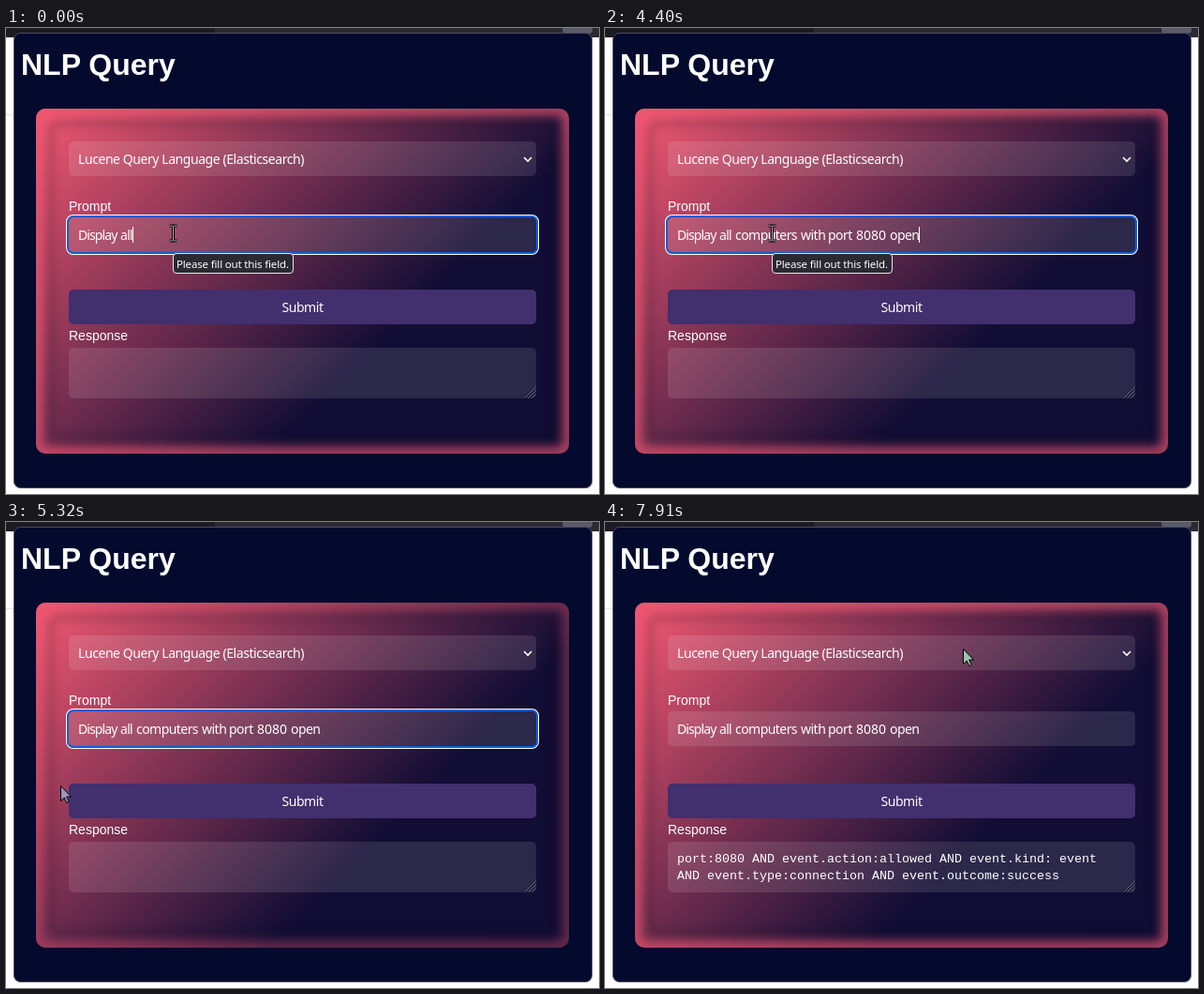
These frames come from a looping animation (633x497 px, 8 s). An HTML page:

```html
<!DOCTYPE html>
<html lang="en">
<head>
<meta charset="utf-8">
<title>NLP Query</title>
<style>
  html, body { margin: 0; width: 100%; height: 100%; overflow: hidden; background: #fff; }
  svg { display: block; width: 633px; height: 497px; }
  text { fill: #fff; white-space: pre; }
  .ui { font: 14px "Noto Sans", sans-serif; letter-spacing: -.43px; }
  .label { font: 14px "Liberation Sans", Arial, sans-serif; }
  .title { font: bold 32px "Liberation Sans", Arial, sans-serif; }
  .tip { font: 11.5px "Noto Sans", sans-serif; letter-spacing: -.16px; }
  .code { font: 13.333px "Liberation Mono", monospace; }
  .field { fill: #fff; fill-opacity: .11; }
</style>
</head>
<body>
<svg viewBox="0 0 633 497">
  <defs>
    <!-- 135deg across the 569 x 368 card -->
    <linearGradient id="fade" gradientUnits="userSpaceOnUse" x1="82.25" y1="35.75" x2="550.75" y2="504.25">
      <stop id="start" offset="0.02"/>
      <stop offset="0.66" stop-color="#110d34"/>
    </linearGradient>
    <clipPath id="cardClip"><rect x="32" y="86" width="569" height="368" rx="10"/></clipPath>
    <filter id="soft" x="-10%" y="-10%" width="120%" height="120%"><feGaussianBlur stdDeviation="6"/></filter>
    <filter id="softer" x="-10%" y="-10%" width="120%" height="120%"><feGaussianBlur stdDeviation="4"/></filter>
  </defs>

  <!-- browser window -->
  <rect width="633" height="10" fill="#2b2a33"/>
  <rect width="223" height="10" fill="#1c1b22"/>
  <rect x="594" y="-6" width="32" height="12" rx="4" fill="#5b5a68"/>
  <rect y="92" width="9" height="1" fill="#e4e4e8"/>
  <rect x="8.5" y="5.5" width="617" height="485" rx="7" fill="#030a2d" stroke="#4a4a63"/>
  <text class="title" x="16" y="50">NLP Query</text>

  <!-- card -->
  <g clip-path="url(#cardClip)">
    <rect x="32" y="86" width="569" height="368" fill="url(#fade)"/>
    <rect x="48" y="102" width="537" height="336" rx="8" fill="none" stroke="#060824" stroke-width="9" opacity=".14" filter="url(#softer)"/>
    <rect id="glow" x="32" y="86" width="569" height="368" rx="10" fill="none" stroke-width="13" filter="url(#soft)"/>
  </g>

  <rect class="field" x="67" y="121" width="499" height="37" rx="5"/>
  <text class="ui" x="77" y="145">Lucene Query Language (Elasticsearch)</text>
  <path d="M553 138l4 4 4-4" fill="none" stroke="#fff" stroke-width="1.6"/>

  <text class="label" x="67" y="195">Prompt</text>
  <rect class="field" x="67" y="202" width="499" height="37" rx="5"/>
  <g id="focus" fill="none">
    <rect x="64.7" y="199.7" width="503.6" height="41.6" rx="7" stroke="#fff" stroke-width="1.4"/>
    <rect x="66" y="201" width="501" height="39" rx="6" stroke="#0a5fd8" stroke-width="2"/>
  </g>
  <g id="prompt" class="ui"></g>
  <rect id="caret" y="212" width="1" height="17" fill="#fff"/>

  <rect x="67" y="279" width="499" height="37" rx="5" fill="#422f6e"/>
  <text class="ui" x="316.5" y="303" text-anchor="middle">Submit</text>

  <text class="label" x="67" y="333">Response</text>
  <rect class="field" x="67" y="341" width="499" height="54" rx="5"/>
  <path d="M552.5 394.5l12-12M556.5 394.5l8-8M560.5 394.5l4-4" stroke="#0c0b20"/>
  <path d="M553.5 394.5l12-12M557.5 394.5l8-8M561.5 394.5l4-4" stroke="#8a899c" stroke-width=".7"/>
  <g id="response" class="code">
    <text x="77" y="363">port:8080 AND event.action:allowed AND event.kind: event</text>
    <text x="77" y="381">AND event.type:connection AND event.outcome:success</text>
  </g>

  <g id="tip">
    <rect x="178.5" y="240.5" width="128" height="21" rx="3.5" fill="#2b2a33" stroke="#e8e8ec"/>
    <text class="tip" x="182" y="256">Please fill out this field.</text>
  </g>

  <circle id="click" cx="167" cy="300" r="15" fill="#a1963a"/>

  <!-- pointers, each with its hot spot at 0,0 -->
  <g id="ibeam" fill="none">
    <path d="M-4-8h3l1 1 1-1h3M0-7V7M-4 8h3l1-1 1 1h3" stroke="#000" stroke-width="3"/>
    <path d="M-4-8h3l1 1 1-1h3M0-7V7M-4 8h3l1-1 1 1h3" stroke="#b9aeb8" stroke-width="1"/>
  </g>
  <path id="arrow" d="M.5.5V16.5L4.2 13 6.8 18.6 9.2 17.5 6.7 12H11.5Z" stroke="#000"/>
  <g id="hand" stroke="#000" stroke-linejoin="round">
    <path d="M-1.5 1.5Q0-.8 1.5 1.5V8Q3 6.8 4.3 8.4 5.8 7.5 6.8 9.2 8.8 8.8 9 11V17L7 20.5V23H-1V20.5L-5 14Q-6.5 11.3-4 11.3L-1.5 14Z"/>
    <path d="M1.5 8v4M4.3 8.6V12M6.8 9.4V12" fill="none"/>
  </g>
</svg>

<script>
const LOOP = 8000;
const $ = id => document.getElementById(id);
const show = (id, on) => $(id).setAttribute("visibility", on ? "visible" : "hidden");
const mix = (a, b, k) => `rgb(${a.map((v, i) => Math.round(v + (b[i] - v) * k))})`;
const PURPLE = [116, 58, 113], PINK = [236, 86, 112];

// the latest entry whose time has come
const latest = (keys, t) => keys.reduce((hit, key) => key[0] <= t ? key : hit, keys[0]);

// [word, x, letter spacing]
const words = [
  ["Display", 77, -.9], ["all", 122, -.7], ["computers", 139, -.55], ["with", 209, -.5],
  ["port", 238, -.5], ["8080", 268, 0], ["open", 304, -.55]
].map(([text, x, gap]) => {
  const node = document.createElementNS("http://www.w3.org/2000/svg", "text");
  node.setAttribute("x", x);
  node.setAttribute("y", 226);
  node.style.letterSpacing = gap + "px";
  $("prompt").append(node);
  return { text, x, node };
});

// [time, characters typed]
const typing = [
  [0, 11], [130, 12], [340, 13], [470, 14], [600, 15], [860, 16], [1200, 17], [1400, 18],
  [1530, 19], [1660, 20], [1860, 22], [1930, 24], [2000, 26], [2060, 28], [2130, 29],
  [2270, 30], [2330, 31], [2400, 32], [2730, 33], [2930, 34], [3190, 35], [3320, 36],
  [3460, 37], [3730, 41]
];

// [time, x, y]
const entry = [
  [5180, 33, 268], [5250, 46, 277], [5320, 58, 281], [5380, 90, 288],
  [5450, 125, 294], [5510, 148, 296], [5650, 165, 298], [5710, 170, 299]
];

// [time, card tint, edge glow]
const hover = [
  [0, 1, 1], [4790, 0, 0], [5180, .35, .06], [5250, .75, .12], [5320, 1, .2],
  [5380, 1, .42], [5450, 1, .65], [5510, 1, .85], [5650, 1, .95], [5710, 1, 1]
];

function drawPrompt(t) {
  const count = latest(typing, t)[1];
  let at = 0, caret = 77;
  for (const { text, x, node } of words) {
    const part = text.slice(0, Math.max(0, count - at));
    if (node.textContent !== part) node.textContent = part;
    if (count >= at) caret = x + (part ? node.getComputedTextLength() : 0);
    at += text.length + 1;
  }
  $("caret").setAttribute("x", Math.round(caret));
  show("caret", t < 3930 || (t >= 4400 && t < 5180));
}

function pointerAt(t) {
  if (t < 4790) return [178.5, 219];
  if (t < 5180) return null;
  if (t < 7510) return latest(entry, t).slice(1);
  const s = Math.min(7, Math.floor((t - 7510) / 66.6) + 1) / 7;
  const curve = (a, b, c) => (1 - s) ** 2 * a + 2 * s * (1 - s) * b + s * s * c;
  return [curve(170, 345, 382), curve(299, 254, 135)];
}

function drawPointer(t) {
  const spot = pointerAt(t);
  let kind = "";
  if (spot) {
    const [x, y] = spot;
    kind = y > 279 && x >= 160 ? "hand" : y > 202 && y < 239 ? "ibeam" : "arrow";
    $(kind).setAttribute("transform", `translate(${x} ${y})`);
  }
  for (const id of ["hand", "ibeam", "arrow"]) show(id, id === kind);
  const pressed = t >= 6110 && t < 6240;
  show("click", pressed);
  $("hand").setAttribute("fill", pressed ? "#d3c77c" : "#d8d2da");
  $("arrow").setAttribute("fill", t < 7000 ? "#9b97c0" : "#9dc5ad");
}

function render(t) {
  const [, tint, glow] = latest(hover, t);
  const color = mix(PURPLE, PINK, tint);
  $("start").setAttribute("stop-color", color);
  $("glow").setAttribute("stroke", color);
  // the dimmer purple needs a higher opacity to show as well
  $("glow").setAttribute("opacity", .6 - .25 * tint + .45 * glow);
  drawPrompt(t);
  drawPointer(t);
  show("focus", t < 6110);
  show("tip", t < 4790);
  show("response", t >= 6440);
}

function tick() {
  render(performance.now() % LOOP);
  requestAnimationFrame(tick);
}
tick();
</script>
</body>
</html>
```
